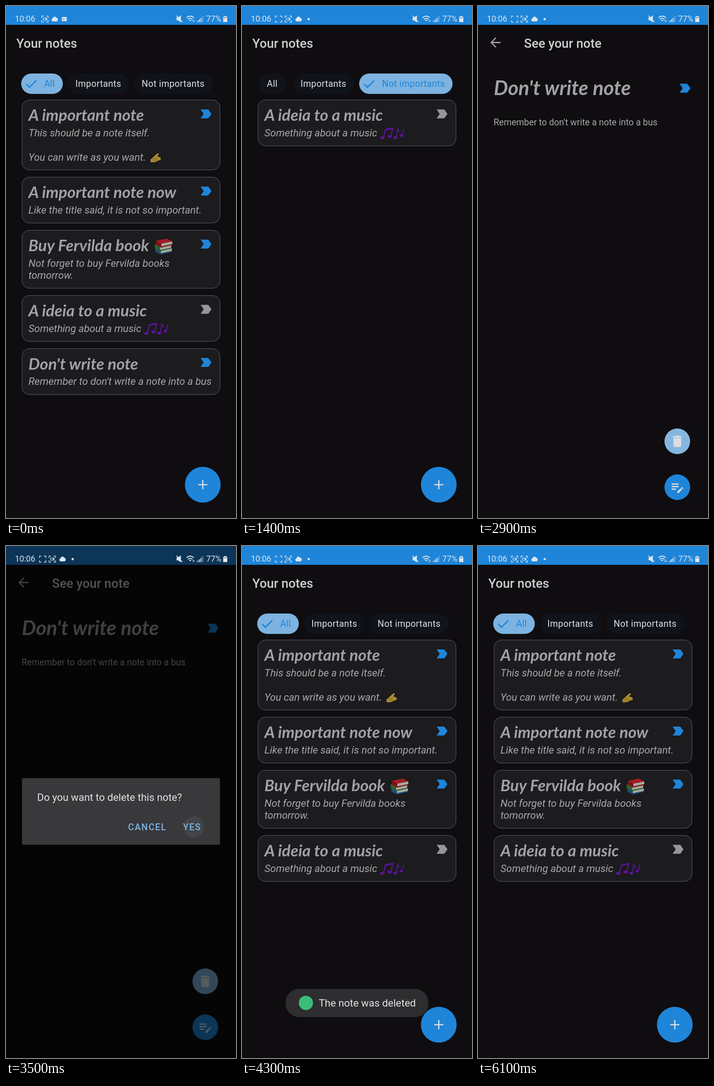
An HTML page that plays this animation: 502 by 1115 pixels, repeating every 6.2 s.

```html
<!DOCTYPE html>
<html lang="en">
<head>
<meta charset="utf-8">
<title>Your notes</title>
<style>
  html, body { margin: 0; height: 100%; overflow: hidden; background: #0f0d10; }
  svg { display: block; width: 100%; height: 100%; font-family: Roboto, sans-serif; }
  .head { font-size: 27.6px; font-weight: 500; fill: #cfcdd0; }
  .title { font: italic bold 35.1px Lato, cursive; fill: #a3a1a4; }
  .body { font-size: 22.3px; font-style: italic; fill: #a9a7aa; }
  .chip { font-size: 19.5px; letter-spacing: .42px; }
  .button { font-size: 19.5px; font-weight: 500; letter-spacing: 1.7px; fill: #7db4e6; }
  .status { font-size: 17.8px; fill: #dfe6ee; }
</style>
</head>
<body>
<svg id="stage" viewBox="0 0 502 1115"></svg>
<script>
const LOOP = 6200, BLUE = '#1e85d9', LIGHT = '#7db3e0';
const CHIPS = [['All', 58], ['Importants', 133.5], ['Not importants', 171]];
const OPEN = 2650, CLOSE = 3650;

const ARROW = 'M20 11H7.83l5.59-5.59L12 4l-8 8 8 8 1.41-1.41L7.83 13H20z';
const TRASH = 'M6 19c0 1.1.9 2 2 2h8c1.1 0 2-.9 2-2V7H6zM19 4h-3.5l-1-1h-5l-1 1H5v2h14z';
const EDIT = 'M3 10h11v2H3zm0-2h11V6H3zm0 8h7v-2H3zm15-3.13.71-.71c.4-.4 1-.4 1.41 0l.71.71c.4.4.4 1 0 1.41l-.71.71zm-.71.71-5.3 5.3V21h2.12l5.3-5.3z';
const FLAG = 'M3.5 19h11c.67 0 1.27-.33 1.63-.84L20.500 12l-4.37-6.16c-.36-.51-.96-.84-1.63-.84h-11l4.84 7z';

const text = (x, y, cls, s, extra = '') => `<text x="${x}" y="${y}" class="${cls}" ${extra}>${s}</text>`;
const icon = (cx, cy, d, color) =>
  `<path transform="translate(${cx - 16.7} ${cy - 16.7}) scale(1.392)" d="${d}" fill="${color}"/>`;
const ripple = (x, y, r, start, clip, color = '#9ab') =>
  `<g clip-path="url(#${clip})"><circle class="ripple" cx="${x}" cy="${y}" data-r="${r}" data-start="${start}" fill="${color}"/></g>`;
const clip = (id, x, y, w, h, rx) =>
  `<clipPath id="${id}"><rect x="${x}" y="${y}" width="${w}" height="${h}" rx="${rx}"/></clipPath>`;

// Small pictures inside the notes; y counts from the top of the card
const hand = `<path d="M314 136l2-6 14-14 3 3-14 14z" fill="#5d5238"/>
  <path d="M315 130l10-9 6-5 3 1-4 6 7 2 1 5-6 2-6 3-9 1-1-3z" fill="#a98b30"/>
  <path d="M320 129l9-3M321 132l9-2" stroke="#6d571b" stroke-width="1"/>`;
const book = (x, y, color, dark) => `<path d="M${x} ${y}l12 6v6l-12-6z" fill="${dark}"/>
  <path d="M${x + 12} ${y + 6}l24-5v6l-24 5z" fill="#aaa89e"/>
  <path d="M${x} ${y}l24-5 12 6-24 5z" fill="${color}"/>
  <path d="M${x} ${y + 6}l12 6 24-5v2l-24 5.500-12-6z" fill="${dark}"/>`;
const books = book(326, 38, '#285f8f', '#1d4d7b') + book(324.5, 31, '#3c7a35', '#2b6329') + book(327, 23, '#a31b25', '#7d1019');
const music = `<g fill="#5a169b" stroke="#5a169b" stroke-width="2">
  <path d="M309 82l4-18 16-3-4 18M313 65l15-3" fill="none" stroke-width="2.4"/>
  <ellipse cx="306" cy="82.500" rx="3.500" ry="2"/><ellipse cx="322" cy="79.500" rx="3.500" ry="2"/>
  <path d="M337 81l3-20q0 6 6 9M350 77l3-14" fill="none"/>
  <ellipse cx="334.500" cy="82" rx="3" ry="2"/><ellipse cx="347.500" cy="77.500" rx="2.600" ry="1.700"/></g>`;

const NOTES = [
  { title: 'A important note', lines: ['This should be a note itself.', '', 'You can write as you want.'], h: 152.3, art: hand },
  { title: 'A important note now', lines: ['Like the title said, it is not so important.'], h: 100 },
  { title: 'Buy Fervilda book', lines: ['Not forget to buy Fervilda books', 'tomorrow.'], h: 126.3, art: books },
  { title: 'A ideia to a music', lines: ['Something about a music'], h: 100, art: music, plain: true },
  { title: "Don't write note", lines: ["Remember to don't write a note into a bus"], h: 100 }
];
const card = n => `<g class="card">
  <rect x="35" width="432" height="${n.h}" rx="16" fill="#1c1b1e" stroke="#626164"/>
  ${n === NOTES[4] ? ripple(250, 50, 240, 2400, 'cardClip') : ''}
  ${text(49, 45.5, 'title', n.title)}
  ${n.lines.map((s, i) => text(49, 79.3 + i * 26.5, 'body', s)).join('')}
  ${n.art || ''}${icon(436.6, 30.2, FLAG, n.plain ? '#979598' : BLUE)}</g>`;

const chip = ([label, w], i) => `<g class="chip">
  <rect y="147" width="${w}" height="44.500" rx="22.250"/>
  ${ripple([29, 67, 83][i], 169, 75, [1600, 300, 840][i], 'chip' + i)}
  <path d="M11 170l7 7 15-15" fill="none" stroke="${BLUE}" stroke-width="2.800"/>
  <text y="176">${label}</text></g>`;

const camera = x => `<path d="M${x} 26v-4h4m6 0h4v4m0 5v4h-4m-6 0h-4v-4"/>`;
const lens = x => `<path d="M${x + 3.5} 26h5v5h-5zm5 2l2.500-2v5l-2.500-2" stroke-width="1.200"/>`;
const cloud = x => `<path d="M${x + 3} 33.500a3.200 3.200 0 0 1 0-6.300 4.400 4.400 0 0 1 8.300-1.500 4 4 0 0 1 0 7.800z" fill="#dfe6ee" stroke="none"/>`;
const status = `<g fill="none" stroke="#dfe6ee" stroke-width="1.300">
  <g id="before">${camera(78)}${lens(78)}${cloud(99)}
    <path d="M122 24h10.500v9h-10.500z" fill="#dfe6ee" stroke="none"/><path d="M125 27l2 1.500-2 1.500" stroke="${BLUE}"/></g>
  <g id="after">${camera(73)}<g id="lens">${lens(73)}</g>${camera(94)}${lens(94)}${cloud(116)}
    <circle cx="145.500" cy="28.500" r="2.500" fill="#dfe6ee" stroke="none"/></g>
  <path d="M373 25.500h3l5-4v13l-5-4h-3z" fill="#dfe6ee"/><path d="M372 21l13 14" stroke-width="1.800"/>
  <path d="M394 25.500q8-7 16 0M397 29q5-4.500 10 0M400 32q2-2 4 0" stroke-width="2"/>
  <path d="M408 35v-5m2.500 0v5" stroke-width="1"/>
  <path d="M418.500 35v-3m3.500 3v-6m3.500 6v-9" stroke-width="2"/><path d="M429.300 35v-13" stroke-width="2" opacity=".5"/>
  <path d="M476 22h5v1.500h2v11.500h-9v-11.500h2z" fill="#dfe6ee" stroke="none"/>
  <path d="M475 24.500h7v2.500h-7z" fill="#8aa9c4" stroke="none"/></g>
  ${text(19.5, 34.3, 'status', '10:06')}${text(437, 34.3, 'status', '77%')}`;

const $ = id => document.getElementById(id);
$('stage').innerHTML = `<defs>
  ${CHIPS.map((c, i) => clip('chip' + i, 0, 147, c[1], 44.5, 22.25)).join('')}
  ${clip('cardClip', 35, 0, 432, 100, 16)}${clip('trashClip', 407, 920, 56, 56, 28)}${clip('yesClip', 371, 587, 71, 50, 4)}</defs>
  <rect width="502" height="1115" fill="#0f0d10"/>
  <rect width="502" height="41" fill="${BLUE}"/>
  <g id="list">${text(22.5, 90.5, 'head', 'Your notes')}
    ${CHIPS.map(chip).join('')}${NOTES.map(card).join('')}
    <circle cx="429.500" cy="1042.500" r="39" fill="${BLUE}"/>
    <path d="M419.500 1042.500h20m-10-10v20" stroke="#dcdee2" stroke-width="2.700"/></g>
  <g id="detail">${icon(38, 79.5, ARROW, '#9d9b9e')}${text(100.5, 90.5, 'head', 'See your note')}
    ${text(34.5, 194, 'title', "Don't write note", 'style="font-size:43.8px"')}${icon(451.8, 179, FLAG, BLUE)}
    ${text(34, 260, 'body', "Remember to don't write a note into a bus", 'style="font-size:19.4px;font-style:normal"')}
    <circle cx="435" cy="948" r="28" fill="${LIGHT}"/>${ripple(435, 948, 40, 2780, 'trashClip', '#bcd')}
    ${icon(435, 948, TRASH, '#dcdee2')}
    <circle cx="435" cy="1048" r="28" fill="${BLUE}"/>${icon(435, 1048, EDIT, '#dcdee2')}</g>
  <rect id="dim" width="502" height="1115"/>
  ${status}
  <g id="dialog"><rect x="35" y="505.500" width="432" height="145" rx="3" fill="#39383a"/>
    ${ripple(410, 612, 30, 3390, 'yesClip', '#89a')}
    ${text(68, 554.5, '', 'Do you want to delete this note?', 'font-size="22.3" fill="#e2e1e4"')}
    ${text(266.5, 619, 'button', 'CANCEL')}${text(386.5, 619, 'button', 'YES')}</g>
  <g id="toast"><rect x="95" y="964.500" width="312" height="61.500" rx="30" fill="#2e2d2f"/>
    <circle cx="139.500" cy="995" r="15.500" fill="#3bbd78"/>
    ${text(167.5, 1003, '', 'The note was deleted', 'font-size="22.3" fill="#e2e1e4"')}</g>`;
// The floating button stays above the toast
$('stage').insertBefore($('toast'), $('list'));

// start time, chosen chip, notes shown
const STATES = [
  [0, 0, [0, 1, 2, 3, 4]], [400, 1, [0, 1, 2, 4]], [1000, 2, [3]],
  [1700, 0, [0, 1, 2, 3, 4]], [CLOSE, 0, [0, 1, 2, 3]]
];
const places = shown => {
  const ys = [];
  let y = 204.7;
  for (const i of shown) { ys[i] = y; y += NOTES[i].h + 15.7; }
  return ys;
};
const PLACES = STATES.map(s => places(s[2]));

const ramp = (t, from, length) => Math.min(1, Math.max(0, (t - from) / length));
const ease = p => (1 - Math.cos(Math.PI * p)) / 2;
const fade = (id, v) => $(id).setAttribute('opacity', v);
const cards = [...document.querySelectorAll('.card')];
const chips = [...document.querySelectorAll('g.chip')];
const ripples = [...document.querySelectorAll('.ripple')];

function drawList(t) {
  const k = STATES.findLastIndex(s => s[0] <= t);
  const [start, chosen] = STATES[k];
  const next = PLACES[k];
  const prev = k === 0 || start === CLOSE ? next : PLACES[k - 1];
  const age = t - start;
  const removing = cards.some((_, i) => prev[i] && !next[i]);
  const moving = cards.some((_, i) => prev[i] && next[i] && prev[i] !== next[i]);
  const moveAt = removing ? 120 : 0, addAt = moveAt + (moving ? 250 : 0);

  cards.forEach((el, i) => {
    const a = prev[i], b = next[i];
    const y = a && b ? a + (b - a) * ease(ramp(age, moveAt, 250)) : a || b || 0;
    const alpha = a && b ? 1 : a ? 1 - ramp(age, 0, 120) : b ? ramp(age, addAt, 120) : 0;
    el.setAttribute('transform', `translate(0 ${y})`);
    el.setAttribute('opacity', alpha);
  });

  let x = 33.2;
  chips.forEach((el, i) => {
    const on = i === chosen, w = CHIPS[i][1] + (on ? 32.8 : 0);
    const slot = Math.max(w, 67);
    const box = el.querySelector('rect'), label = el.querySelector('text');
    el.setAttribute('transform', `translate(${x + (slot - w) / 2} 0)`);
    box.setAttribute('width', w);
    box.setAttribute('fill', on ? LIGHT : '#10131a');
    label.setAttribute('x', on ? 50 : 16.6);
    label.setAttribute('fill', on ? BLUE : '#e2e1e4');
    el.querySelector(':scope > path').setAttribute('opacity', +on);
    x += slot + 11;
  });
}

function draw(t) {
  const inDetail = t >= OPEN && t < CLOSE;
  fade('list', +!inDetail);
  fade('detail', +inDetail);
  drawList(t);

  const dialog = ramp(t, 3000, 150) * (1 - ramp(t, 3580, 150));
  fade('dim', dialog * 0.6);
  fade('dialog', dialog);
  fade('toast', ramp(t, 3750, 200) * (1 - ramp(t, 5700, 200)));

  fade('before', +(t < 400));
  fade('after', +(t >= 400));
  fade('lens', +(t % 1000 < 300));

  for (const el of ripples) {
    const age = t - el.dataset.start;
    el.setAttribute('r', el.dataset.r * (0.4 + 0.6 * ramp(age, 0, 180)));
    el.setAttribute('opacity', age < 0 ? 0 : 0.12 * ramp(age, 0, 60) * (1 - ramp(age, 180, 170)));
  }
}

function tick() {
  draw(performance.now() % LOOP);
  requestAnimationFrame(tick);
}
tick();
</script>
</body>
</html>
```
